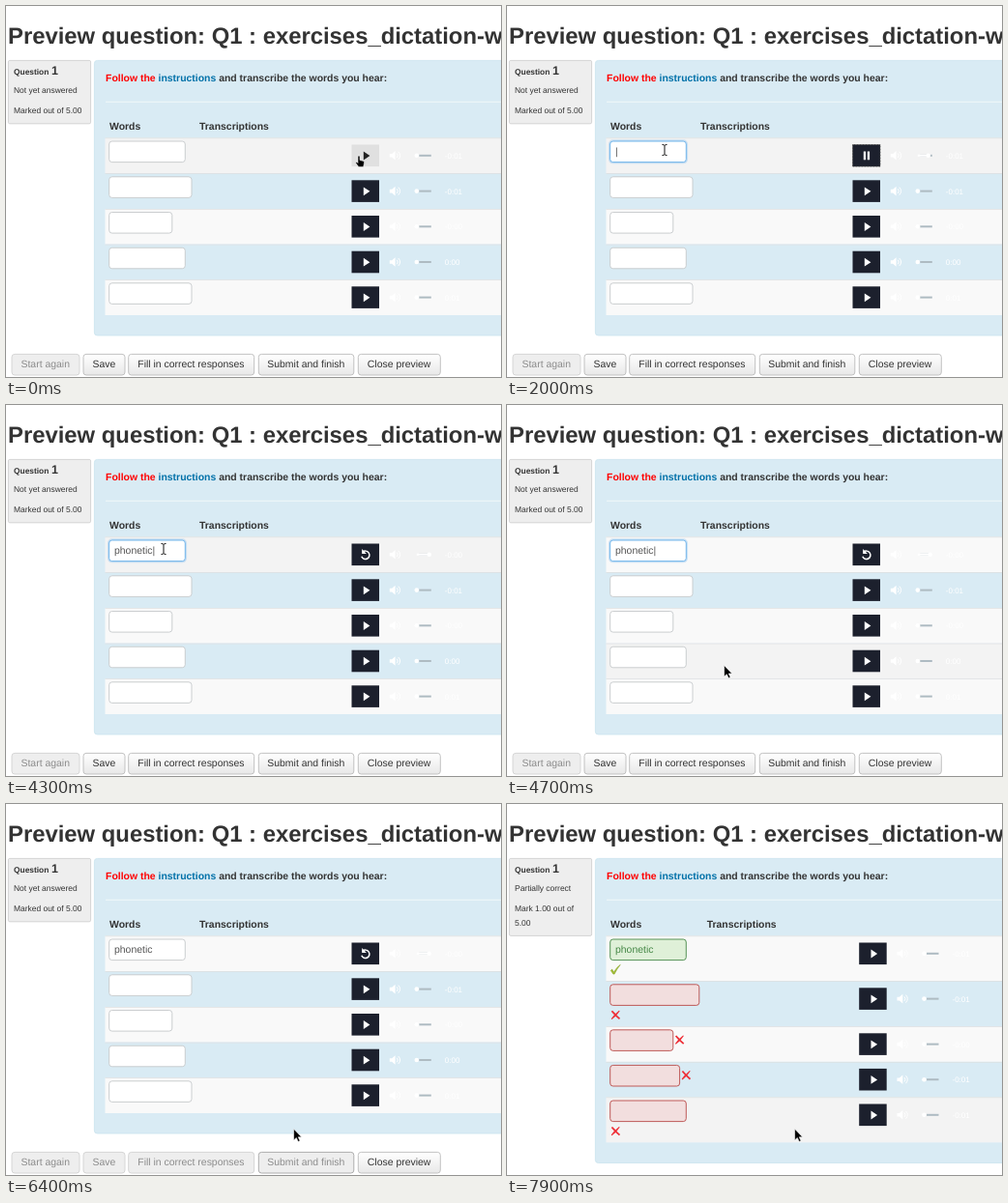
An HTML page for the animation above (8000 ms loop, 512 by 384 pixels).

```html
<!DOCTYPE html>
<html lang="en">
<head>
<meta charset="utf-8">
<title>Dictation exercise</title>
<style>
html, body { margin: 0; width: 100%; height: 100%; overflow: hidden; background: #fff; }
svg { display: block; width: 512px; height: 384px; }
text { font-family: "Liberation Sans", Arial, sans-serif; text-rendering: geometricPrecision; white-space: pre; }
</style>
</head>
<body>
<svg id="stage" viewBox="0 0 512 384"></svg>
<script>
const stage = document.getElementById('stage');
const LOOP = 8000, STEP = 100;
const WORD = 'phonetic';
const PLAY = 400, ENDED = 2300, FOCUS = 1900, BLUR = 5900;
const SUBMIT = 6100, GRADED = 6600, MEDIA = 7400;

// time, x, y of the pointer
const path = [
  [0, 363, 155], [600, 363, 155], [1200, 202, 149], [1500, 152, 149], [2000, 163, 149],
  [4400, 163, 149], [4700, 224.6, 269.5], [5300, 298, 362], [5700, 308, 369],
  [6000, 308, 369], [6400, 297.6, 336.3], [LOOP, 297.6, 336.3]
];

// row edges and input right edges for each layout
const layouts = {
  quiz: { rows: [136.5, 173.3, 210, 246.7, 283.3, 320], ends: [185.7, 192.4, 172.2, 185.7, 192.4], bottom: 341, shift: 0 },
  loading: { rows: [136.5, 183.3, 230.3, 274.5, 318.8, 365], ends: [185.7, 199.2, 172.2, 179, 185.7], bottom: 400, shift: 6.7 },
  graded: { rows: [136.5, 183.3, 230.3, 266.9, 303.5, 350.3], ends: [185.7, 199.2, 172.2, 179, 185.7], bottom: 371.5, shift: 6.7 }
};

const layoutAt = t => layouts[t < GRADED ? 'quiz' : t < MEDIA ? 'loading' : 'graded'];
const rect = (x, y, w, h, fill, extra = '') =>
  `<rect x="${x}" y="${y}" width="${w}" height="${h}" fill="${fill}" ${extra}/>`;
const draw = (d, extra) => `<path d="${d}" ${extra}/>`;
const text = (x, y, s, size = 10.45, fill = '#333', bold = false) =>
  `<text x="${x}" y="${y}" font-size="${size}" fill="${fill}"${bold ? ' font-weight="700"' : ''}>${s}</text>`;
const at = (x, y, s) => `<g transform="translate(${x} ${y})">${s}</g>`;

function pointerAt(t) {
  const i = path.findIndex(p => p[0] > t);
  const [t0, x0, y0] = path[i - 1], [t1, x1, y1] = path[i];
  const k = (t - t0) / (t1 - t0);
  return [x0 + (x1 - x0) * k, y0 + (y1 - y0) * k];
}

function pointer(x, y) {
  const shapes = {
    beam: draw('M-2.5-5.5Q0-5.5 0-4.5Q0-5.5 2.5-5.5M0-4.5V4.5M-2.5 5.5Q0 5.5 0 4.5Q0 5.5 2.5 5.5', 'fill="none" stroke="#111"'),
    hand: draw('M1 1Q1 0 2 0T3 1V4.6L7 5.6Q7.6 6 7.4 8L6.6 11.6H1.8L-1.2 7.6Q-1.4 6.2 0 6.6L1 7.6Z', 'stroke="#fff" stroke-width=".5"'),
    arrow: draw('M0 0V11.6L2.7 9.2 4.6 13.2 6.5 12.3 4.7 8.5H8.2Z', 'stroke="#fff" stroke-width=".6"')
  };
  const overInput = x < 186 && y > 140 && y < 162;
  const overPlay = x > 358 && x < 386 && y > 144 && y < 166;
  return at(x, y, shapes[overInput ? 'beam' : overPlay ? 'hand' : 'arrow']);
}

function sidebar(graded) {
  const lines = graded
    ? ['Partially correct', 'Mark 1.00 out of', '5.00']
    : ['Not yet answered', 'Marked out of 5.00'];
  return rect(2.4, 56.4, 85.2, graded ? 80 : 65.4, '#eee', 'stroke="#ccc" stroke-width=".8" rx="1.5"')
    + text(8, 70.6, 'Question', 8.4, '#333', true) + text(47, 70.6, '1', 12.5, '#333', true)
    + lines.map((s, i) => text(8, [90, 110.7, 126][i], s, 8.45)).join('');
}

// icon: play, pause or replay; pos: slider position from 0 to 1
function player(icon, light, ring, pos, time) {
  const ink = light ? '#222' : '#fff';
  const icons = {
    play: draw('M12 6.8V15.6L18.6 11.2Z', `fill="${ink}"`),
    pause: draw('M11 6.8h2.3v8.6h-2.3zM15 6.8h2.3v8.6h-2.3z', `fill="${ink}"`),
    replay: draw('M11 8.5A4.2 4.2 0 1 1 10 13', `fill="none" stroke="${ink}" stroke-width="1.5"`)
      + draw('M10.4 5.3V10.2H15Z', `fill="${ink}"`)
  };
  return rect(-.3, -.3, 28.5, 22.6, light ? '#e0e0e0' : '#1c202d',
      ring ? 'stroke="#444" stroke-width=".8" stroke-dasharray="1 .5"' : '')
    + icons[icon]
    + draw('M39 9.2h2.4l3.4-3v9.6l-3.4-3H39z', 'fill="#fff"')
    + draw('M46.5 8.7q2 2.3 0 4.6M48 7q3.6 4 0 8', 'fill="none" stroke="#fff"')
    + rect(69.5, 10, 12.5, 2, '#aebbc2')
    + rect(67, 10, 15 * pos, 2, '#fff')
    + `<circle cx="${67 + 13 * pos}" cy="11" r="2.3" fill="#fff"/>`
    + text(96, 14, time, 8, '#fff');
}

function field(x2, y, mode, content) {
  const styles = {
    plain: ['#fff', '#c6c9cb', '#555'], focus: ['#fff', '#66afe9', '#555'],
    right: ['#dff0d8', '#468847', '#468847'], wrong: ['#f2dede', '#b94a48', '#b94a48']
  };
  const [fill, line, ink] = styles[mode];
  const box = (color, extra) => rect(106.7, y, x2 - 107.1, 21.6, fill, `rx="3" stroke="${color}" ${extra}`);
  return (mode === 'focus' ? box('#9bcaf0', 'stroke-width="3.5" stroke-opacity=".5"') : '')
    + box(line, 'stroke-width=".9"') + text(112, y + 13.6, content, 10.45, ink);
}

const cross = draw('M-4.6-3.6L-3.2-4.6 0-1.2 3.6-4.6 4.4-4 1.2 .2 4.8 3.4 3.6 4.8 0 1.4-3.8 4.8-4.6 4-1.4 0Z', 'fill="#ee3038"');
const check = draw('M-5 .8-3.6-.4-1.8 2.4Q1-2.6 5-5.2Q1.4-.8-1.2 4.6H-2.4Z', 'fill="#a3bd35" stroke="#7f9d1c" stroke-width=".5"');

function table(t, px, py) {
  const graded = t >= GRADED;
  const { rows, ends, shift } = layoutAt(t);
  const playing = t >= PLAY && t < ENDED;
  const typed = WORD.slice(0, Math.max(0, Math.floor((t - 2300) / 200)));
  const focused = t >= FOCUS && t < BLUR;
  const times = graded ? ['-0:01', '-0:01', '-0:00', '-0:01', '-0:01'] : ['-0:01', '-0:01', '-0:00', '0:00', '0:01'];
  let out = text(107, 128, 'Words', 10.45, '#333', true)
    + text(200 + shift, 128, 'Transcriptions', 10.45, '#333', true);

  for (let i = 0; i < 5; i++) {
    const y = rows[i], h = rows[i + 1] - y, first = i === 0;
    const hover = px > 102 && py >= y && py < y + h;
    out += rect(102.5, y, 410, h, hover ? '#f3f3f3' : i % 2 ? '#d9ebf4' : '#f9f9f9')
      + rect(102.5, y, 410, .7, '#dddfe0');

    const mode = graded ? (first ? 'right' : 'wrong') : first && focused ? 'focus' : 'plain';
    const content = !first ? '' : typed + (mode === 'focus' ? '|' : '');
    out += field(ends[i], y + 3.5, mode, content);
    if (graded) {
      const beside = i === 2 || i === 3;
      out += at(beside ? ends[i] + 6.3 : 112.3, y + (beside ? 13.7 : 35), first ? check : cross);
    }

    if (graded && t < MEDIA) {
      out += rect(364.3, y + 6.8, 28.5, 30, '#131313');
    } else {
      const active = first && !graded;
      const icon = active && playing ? 'pause' : active && t >= ENDED ? 'replay' : 'play';
      const pos = active ? Math.min(1, Math.max(0, (t - PLAY) / (ENDED - PLAY))) : 0;
      const time = active && t >= ENDED ? '-0:00' : times[i];
      out += at(357.8 + shift, y + 7.3, player(icon, active && t < FOCUS, active && playing, pos, time));
    }
  }
  return out;
}

function buttons(t) {
  const list = [
    [6, 70, 'Start again', 15.5], [80, 43, 'Save', 89.5], [126.7, 130, 'Fill in correct responses', 136.3],
    [261.3, 98.5, 'Submit and finish', 270.3], [364.3, 85, 'Close preview', 373.8]
  ];
  return list.map(([x, w, label, tx], i) => {
    const off = i === 0 || (t >= SUBMIT && i < 4);
    const pressed = i === 3 && t >= BLUR;
    return rect(x, 360.4, w, 21.6, off ? '#eee' : 'url(#shade)',
        `rx="3" stroke="${pressed ? '#a5a5a5' : off ? '#d2d2d2' : '#bbb'}" stroke-width=".9"`)
      + text(tx, 374.3, label, 10.45, off ? '#8c8c8c' : '#333');
  }).join('');
}

function render(t) {
  const [px, py] = pointerAt(t);
  const graded = t >= GRADED;
  stage.innerHTML =
    '<defs><linearGradient id="shade" x2="0" y2="1"><stop stop-color="#fff"/><stop offset="1" stop-color="#e8e8e8"/></linearGradient></defs>'
    + text(2, 39, 'Preview question: Q1 : exercises_dictation-w', 23.85, '#333', true)
    + sidebar(graded)
    + rect(91.4, 56.4, 440, layoutAt(t).bottom - 56.4, '#d9ebf4', 'rx="3" stroke="#c9e4ee" stroke-width=".8"')
    + text(103, 78.2, '<tspan fill="#f00">Follow the </tspan><tspan fill="#0070a8">instructions</tspan> and transcribe the words you hear:', 10.45, '#333', true)
    + rect(103, 98.8, 410, .9, '#f4f9fb')
    + table(t, px, py)
    + (graded ? '' : buttons(t))
    + pointer(px, py);
}

let shown = -1;
const start = performance.now();
function frame() {
  const t = Math.floor((performance.now() - start) % LOOP / STEP) * STEP;
  if (t !== shown) render(shown = t);
  requestAnimationFrame(frame);
}
frame();
</script>
</body>
</html>
```
